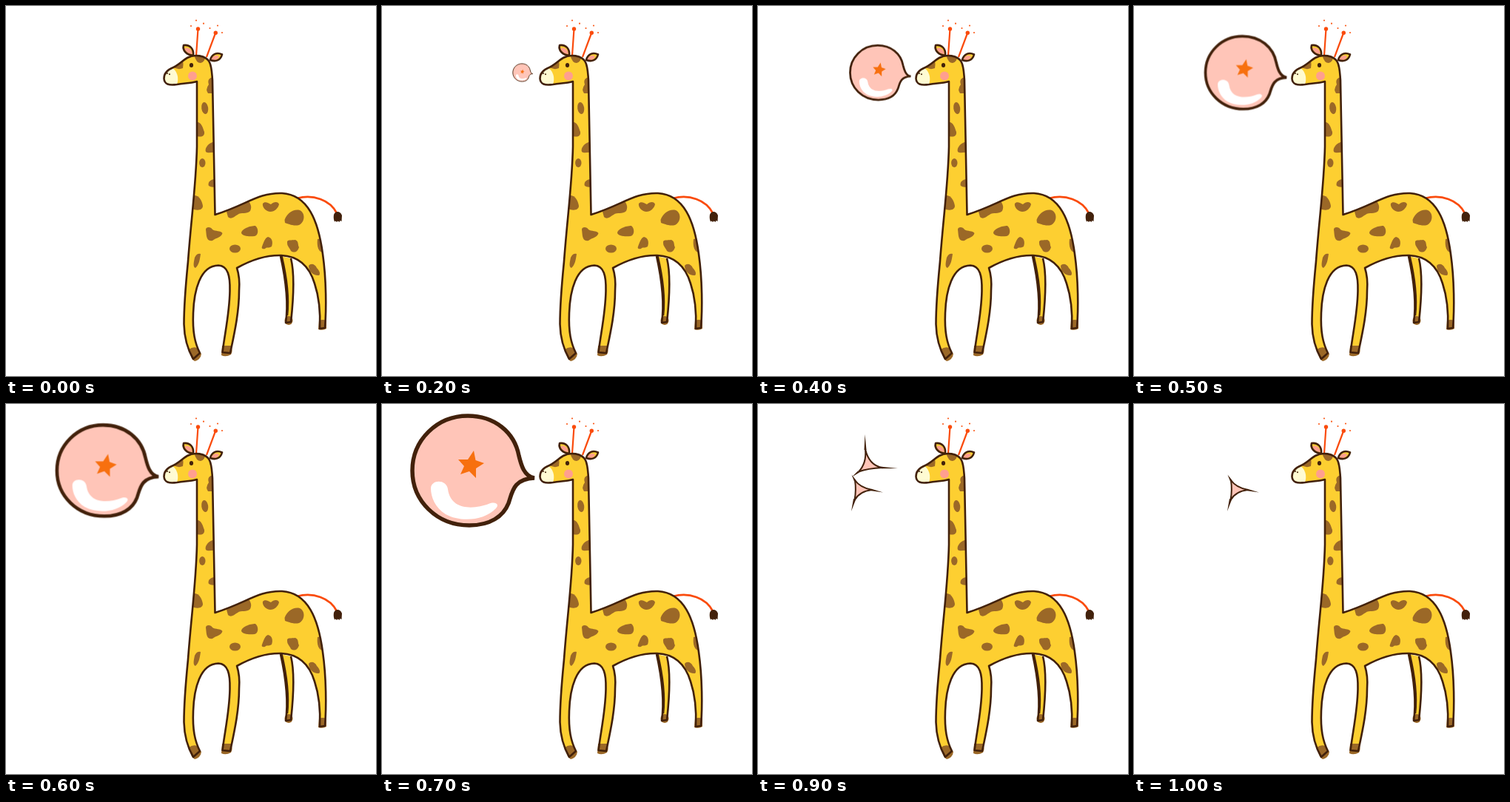
An HTML page for the animation above (1100 ms loop, 500x500 px).

```html
<!DOCTYPE html>
<html lang="en">
<head>
<meta charset="utf-8">
<title>Giraffe blowing a bubble</title>
<style>
  html, body { margin: 0; width: 100%; height: 100%; overflow: hidden; background: #fff; }
  svg { display: block; width: 100vw; height: 100vh; }

  .ink { fill: none; stroke: #42210b; stroke-width: 2.6; stroke-linejoin: round; }
  .skin { fill: #fdcf31; }
  .spot { fill: #9b6827; }
  .pink { fill: #ff9f8f; }
  .dark { fill: #42210b; }
  .red { fill: none; stroke: #fa4b0c; }
  .dots { fill: #fa5c1c; }

  #bubble, .shard { animation: 1100ms step-end infinite; }
  #bubble { animation-name: blow; }
  .shard path:first-child { fill: #ffc5b8; stroke: #42210b; stroke-width: 2; }
  .shard path:last-child { fill: #42210b; }
  #large { animation-name: large; }
  #medium { animation-name: medium; }
  #small { animation-name: small; }

  @keyframes blow {
    0%     { transform: translate(202px, 90px) scale(0); }
    9.09%  { transform: translate(202px, 90px) scale(.01); }
    18.18% { transform: translate(189px, 90px) scale(.163); }
    27.27% { transform: translate(175.4px, 90px) scale(.33); }
    36.36% { transform: translate(161.7px, 90px) scale(.497); }
    45.45% { transform: translate(146.4px, 90px) scale(.665); }
    54.54% { transform: translate(131.2px, 90px) scale(.832); }
    63.63% { transform: translate(116px, 90px) scale(1); }
    72.72%, 100% { transform: translate(116px, 90px) scale(0); }
  }
  @keyframes large {
    0%, 81.81%, 100% { opacity: 0; }
    72.72% { opacity: 1; }
  }
  @keyframes medium {
    0%, 90.9%, 100% { opacity: 0; }
    72.72% { opacity: 1; }
  }
  @keyframes small {
    0%, 100% { opacity: 0; }
    72.72% { opacity: 1; }
  }
</style>
</head>
<body>
<svg viewBox="0 0 500 500">
  <defs>
    <path id="body" d="M282.500 282L279 100C278 88 278 82 275 76C270 66 254 65 245 70C238 74 233 80 226 83
      C216 87 213.500 92 213.500 98C214 106 220 107.500 231 106C241 104 248 105 258 102L258 190
      C257 240 250 290 246 345C242 385 240.500 410 240.500 430C241 450 246 465 253 477L262 469
      C255 455 252 440 253 415C254 385 262 351 287 350.500C300 351 303 365 302.500 385C302 415 296 440 292.500 468
      L303 469C308 445 315 415 315 385C316 372 314 360 312 354C335 341 355 336.500 372 337
      C395 338 410 352 417 375C423 393 425 415 424 436L431 435C433 410 433 370 428 335
      C422 290 408 255 373 253C340 252 325 269 282.500 282Z"/>
    <clipPath id="inside"><use href="#body"/></clipPath>
  </defs>

  <!-- Tail -->
  <path class="red" stroke-width="2.800" d="M393 260C415 254 438 262 447 280"/>
  <path class="dark" d="M443 282C445 276 452 277 454 283L453.500 291L451.500 290L450.500 292L448.500 290.500L447 292L445.500 290.500L444 291.500C442.500 288 442.500 285 443 282Z"/>

  <!-- Far hind leg -->
  <path class="skin" d="M371 338C377 365 382 400 378 428L385 427C388 400 391 365 385 341Z"/>
  <ellipse class="spot" cx="382" cy="425" rx="5.500" ry="6"/>
  <path class="ink" d="M371 338C377 365 382 400 378 428L385 427C388 400 391 365 385 341"/>
  <path class="ink" d="M372.500 338C379 365 382.500 395 380 418"/>

  <!-- Horns -->
  <path class="red" stroke-width="2.200" d="M257 67L259.500 31M271 69L283.300 36"/>
  <g fill="#fa4b0c">
    <circle cx="259.500" cy="31" r="2.700"/>
    <circle cx="283.300" cy="36.300" r="2.700"/>
  </g>
  <g class="dots">
    <circle cx="250" cy="27" r="1.100"/>
    <circle cx="257" cy="19.500" r="1.100"/>
    <circle cx="267" cy="23.700" r="1.100"/>
    <circle cx="275.500" cy="30" r="1.100"/>
    <circle cx="286" cy="26.500" r="1.100"/>
    <circle cx="292" cy="36" r="1.100"/>
  </g>

  <!-- Ears -->
  <path class="skin" d="M253 67C244 66 238 60 240 53C249 52 254 58 253 67Z"/>
  <path class="pink" d="M252 65C246 65 242 61 241.500 57C247 55 251 59 252 65Z"/>
  <path class="ink" d="M253 67C244 66 238 60 240 53C249 52 254 58 253 67Z"/>
  <path class="skin" d="M276 73C278 65 285 62 292 65.500C290 73 284 76 276 73Z"/>
  <path class="pink" d="M277 72C280 67 284 66 288 68C286 73 282 74 277 72Z"/>
  <path class="ink" d="M276 73C278 65 285 62 292 65.500C290 73 284 76 276 73Z"/>

  <!-- Body, spots and muzzle -->
  <use href="#body" class="skin"/>
  <g class="spot" clip-path="url(#inside)">
    <path d="M254 64Q256 77 263 77Q269 76 270 66Z"/>
    <path d="M225 82Q232 87 239 84Q240 79 239 73Z"/>
    <path d="M281 96Q271 97 274 106Q269 113 273 118L281 118Z"/>
    <ellipse cx="268.700" cy="138" rx="4.500" ry="8" transform="rotate(-8 268.700 138)"/>
    <path d="M256 157C264 155 266 165 268 170C269 177 262 178 256 175Z"/>
    <path d="M283 183C274 184 268 192 270 197C274 200 278 197 283 198Z"/>
    <ellipse cx="265.300" cy="212" rx="4.200" ry="6"/>
    <path d="M284 234C276 233 272 239 274 243Q278 246 284 244Z"/>
    <path d="M251 256C262 254 265 265 266 270C266 277 256 277 250 273Z"/>
    <path d="M270 302C270 298 277 298 279 302C283 305 290 303 292.500 307C291 313 284 313 279 317C270 319 271 309 270 302Z"/>
    <path d="M298 278L300 285C304 289 308 285 313 282C318 278 325 282 330 277C333 271 330 266 327 263Z"/>
    <path d="M347 267C350 263 355 267 358 268C362 264 368 264 369 268C368 273 363 278 357 278C350 277 346 271 347 267Z"/>
    <path d="M376.500 289C380 280 388 274 397 276C405 280 404 292 396 296C388 298 381 294 377 293Z"/>
    <path d="M318 307C318 301 330 297 337 297C342 301 341 310 336 311C328 312 320 311 318 307Z"/>
    <ellipse cx="309.500" cy="328" rx="7.500" ry="5.500"/>
    <path d="M346 325C348 320 350 313 354 312C360 313 361 320 359 325C355 328 352 325 350 328C346 329 345 327 346 325Z"/>
    <path d="M380 320C379 315 386 317 391 316C396 318 394 323 396 326C394 333 389 334 385 331C383 326 380 325 380 320Z"/>
    <path d="M421 315C425 313 432 316 430 333C421 334 420 322 421 315Z"/>
    <path d="M409 351C412 347 418 349 420 354C424 358 425 362 423 364C416 365 409 359 409 351Z"/>
    <path d="M255 340C257 335 260 334 263 335C262 342 261 350 256 354C252 353 254 345 255 340Z"/>
    <path fill="#fffbd2" d="M208 83L224 83C233 89 234 100 230 109L208 109Z"/>
  </g>
  <g class="spot">
    <path d="M247 464Q253 460 258 462L264 470Q263 478 255 480Q250 478 247 464Z"/>
    <path d="M292 459H304Q307 466 304 471Q297 475 291 472Z"/>
    <path d="M423 425Q428 423 433 425V436Q428 439 422 437Z"/>
  </g>
  <use href="#body" class="ink"/>

  <!-- Face -->
  <circle class="pink" cx="252" cy="94.500" r="6"/>
  <g class="dark">
    <ellipse cx="250.500" cy="80" rx="2.600" ry="3"/>
    <circle cx="218" cy="91" r="1"/>
    <circle cx="221" cy="92.300" r="1"/>
  </g>

  <g id="bubble">
    <path fill="#ffc5b8" stroke="#42210b" stroke-width="5.500" d="M90 10C76 8 72 -8 69 -20C63 -52 36 -74 0 -74
      C-42 -74 -75 -41 -75 0C-75 41 -42 74 2 74C30 74 48 62 55 44C60 30 61 11 90 10Z"/>
    <path fill="#fff" d="M-50 24C-50 12 -29 11 -27 25C-23 55 10 52 28 45C38 41 43 46 38 51C22 68 -10 70 -30 59C-44 50 -50 36 -50 24Z"/>
    <path fill="#f7700f" d="M8 -27L10.500 -14L22 -10L11 -3L11 10L2 1L-10 5L-5 -6L-13 -15L0 -15Z"/>
  </g>

  <g id="large" class="shard">
    <path d="M79 69Q97 87 122 90Q96 95 82 121Q92 97 79 69Z"/>
    <path d="M55 53L81 68.500L78 71ZM139 87.500L121 91.500L120 88.500ZM67 141L80.500 119L83.500 121Z"/>
  </g>
  <g id="medium" class="shard">
    <path d="M145 61Q150 83 168 86Q148 87 136 91.500Q147 80 145 61Z"/>
    <path d="M144.500 41L146.500 62L143.500 62ZM189 87L167 87.300L167 84.800ZM127 98.500L135 90.500L137 92.500Z"/>
  </g>
  <g id="small" class="shard">
    <path d="M131 103Q138 113 154 116Q137 118 130.500 130Q133 116 131 103Z"/>
    <path d="M126.500 95.500L132.500 103L130 104.500ZM169 119.500L153 117.300L153.500 114.800ZM126 145L129 128L132 129.500Z"/>
  </g>
</svg>
</body>
</html>
```
